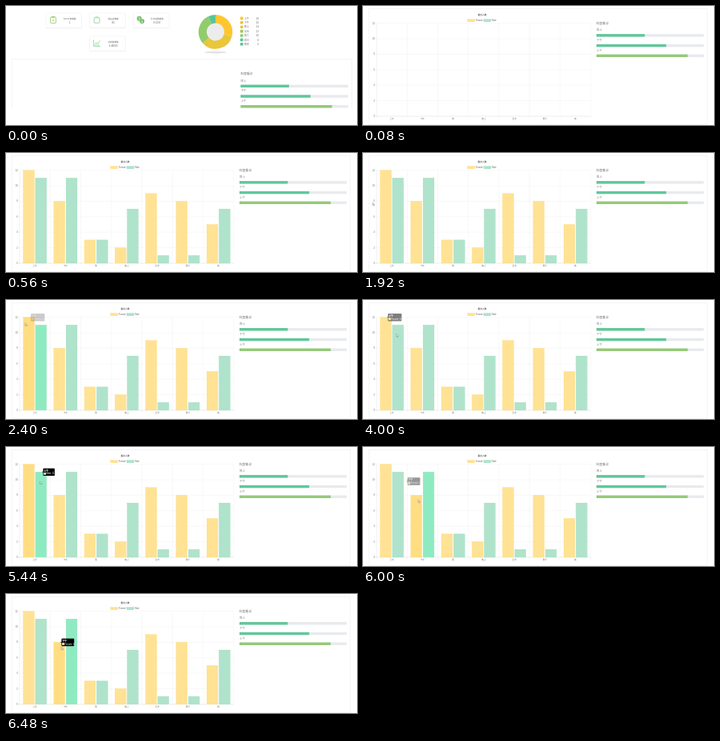
These frames come from a looping animation (439 px wide and 149 px high, 8 s). An HTML page:

```html
<!DOCTYPE html>
<html lang="zh">
<head>
<meta charset="utf-8">
<title>看诊统计</title>
<style>
html, body { margin: 0; width: 100%; height: 100%; overflow: hidden; background: #fff; }
svg { display: block; width: 100%; height: 100%; }
text { font-family: "Liberation Sans", "Noto Sans CJK SC", "Noto Sans CJK", sans-serif; fill: #666; }
</style>
</head>
<body>
<svg id="stage" viewBox="0 0 439 149"></svg>
<script>
const LOOP = 8000, STEP = 80;
const YELLOW = '#ffe294', GREEN = '#b0e3cb';
const YELLOW_ON = '#ffdd82', GREEN_ON = '#8eebc1';
const YELLOW_EDGE = '#ffd873', GREEN_EDGE = '#98d9b9';
const female = [12, 8, 3, 2, 9, 8, 5];
const male = [11, 11, 3, 7, 1, 1, 7];
const days = ['上午', '下午', '急', '晚上', '全天', '周六', '夜'];
const plot = { left: 17, right: 284.8, top: 21.6, base: 138 };
const slot = (plot.right - plot.left) / days.length;
const unit = (plot.base - plot.top) / 12;
const barW = slot * 0.36;

const stage = document.getElementById('stage');

function add(parent, tag, attrs, text) {
  const el = document.createElementNS('http://www.w3.org/2000/svg', tag);
  set(el, attrs);
  if (text !== undefined) el.textContent = text;
  parent.append(el);
  return el;
}
function set(el, attrs) {
  for (const key in attrs) el.setAttribute(key, attrs[key]);
}
const group = (parent, attrs = {}) => add(parent, 'g', attrs);
const rect = (parent, x, y, width, height, fill, more = {}) =>
  add(parent, 'rect', { x, y, width, height, fill, ...more });
const line = (parent, d, stroke, width = 0.4) =>
  add(parent, 'path', { d, stroke, 'stroke-width': width, fill: 'none' });
const label = (parent, x, y, size, text, anchor = 'start', style = '') =>
  add(parent, 'text', { x, y, 'font-size': size, 'text-anchor': anchor, style }, text);

function progressList(parent, x, top, width) {
  label(parent, x, top + 1.6, 3.8, '科室看诊');
  ['晚上', '下午', '上午'].forEach((name, i) => {
    const y = top + 14.2 + i * 12.75;
    label(parent, x, y - 3.9, 3.5, name, 'start', 'fill:#888');
    rect(parent, x, y, width, 3.4, '#e8eaee');
    rect(parent, x, y, width * (0.45 + i * 0.2), 3.4, i < 2 ? '#60c79a' : '#94c979');
  });
}

// Overview page
const overview = group(stage);

function card(x, y, title, value, icon) {
  rect(overview, x + 0.2, y + 0.6, 44.6, 18.4, '#efefef', { rx: 0.6 });
  rect(overview, x, y, 44.6, 18.2, '#fff', { rx: 0.6, stroke: '#ececec', 'stroke-width': 0.5 });
  icon(group(overview, { transform: `translate(${x + 9} ${y + 8.4})` }));
  label(overview, x + 29.5, y + 7.6, 2.7, title, 'middle');
  label(overview, x + 29.5, y + 12.6, 3, value, 'middle');
}
card(50, 9, '今日订单数量', '1', g => {
  rect(g, -3.4, -3.6, 6.8, 7.6, 'none', { rx: 0.6, stroke: '#8cca70', 'stroke-width': 0.8 });
  rect(g, -1.6, -4.5, 3.2, 1.8, '#8cca70');
  line(g, 'M-1.6 .6H1.6M0-1V2.2', '#f0c14a', 0.7);
});
card(104.6, 9, '商品总数量', '85', g => {
  rect(g, -3.4, -2.6, 6.8, 6.4, 'none', { rx: 0.6, stroke: '#7fcf9c', 'stroke-width': 0.8 });
  line(g, 'M-1.7-2.6C-1.7-5 1.7-5 1.7-2.6', '#9bd06d', 0.7);
});
card(159.4, 9, '今日销售数量', '¥ 1597', g => {
  for (const side of [-1.7, 1.7]) {
    add(g, 'circle', { cx: side, cy: side, r: 3.1, fill: '#6fbd62', stroke: '#fff', 'stroke-width': 0.3 });
    label(g, side, side + 1.4, 4, '$', 'middle', 'fill:#fff');
  }
});
card(104.6, 38, '总销售数量', '¥ 48500', g => {
  line(g, 'M-4-4V4H4.4', '#7fcf9c', 0.7);
  line(g, 'M-3 2L-1-.5L1 .8L4-3', '#8cca70', 0.7);
  line(g, 'M-2 3.6V2M0 3.6V1.5M2 3.6V.8', '#8cca70', 0.6);
});

function slice(from, to, fill) {
  const at = (deg, r) => {
    const a = deg * Math.PI / 180;
    return `${262 + r * Math.sin(a)} ${32.4 - r * Math.cos(a)}`;
  };
  add(overview, 'path', {
    fill,
    d: `M${at(from, 21.3)}A21.3 21.3 0 0 1 ${at(to, 21.3)}L${at(to, 11)}A11 11 0 0 0 ${at(from, 11)}Z`
  });
}
add(overview, 'ellipse', { cx: 262, cy: 58, rx: 14, ry: 1.4, fill: '#e3e3e3' });
add(overview, 'circle', { cx: 262, cy: 32.4, r: 11.4, fill: '#ececec' });
const ring = ['#ffc62f', '#e9c63a', '#92cb6c', '#58c596'];
const cuts = [0, 105, 228, 335, 360];
ring.forEach((fill, i) => slice(cuts[i], cuts[i + 1], fill));

['上午', '下午', '晚上', '全天', '周六', '周日', '夜间'].forEach((name, i) => {
  const y = 13.6 + i * 5.4;
  rect(overview, 293, y, 3.6, 3.6, ring[Math.floor((i + 1) / 2)], { rx: 0.5 });
  label(overview, 298, y + 3, 2.9, name);
  label(overview, 316, y + 3, 2.9, 18 - 2 * i, 'end');
});
line(overview, 'M7.2 128V66.6H432.6V128', '#ededed', 0.6);
progressList(overview, 293.4, 84.4, 134.6);

// Chart page
const detail = group(stage);
rect(detail, 7.4, 3.4, 423.4, 145, 'none', { stroke: '#ededed', 'stroke-width': 0.6 });
progressList(detail, 292, 20.9, 134.2);

for (let v = 0; v <= 12; v += 2) {
  const y = plot.base - v * unit;
  line(detail, `M${plot.left - 1.6} ${y}H${plot.right}`, v ? '#eeeeee' : '#cfcfcf');
  label(detail, 14.8, y + 1, 2.7, v, 'end');
}
for (let i = 0; i <= days.length; i++) {
  const x = plot.left + i * slot;
  line(detail, `M${x} ${plot.top}V${plot.base + 1.8}`, i ? '#eeeeee' : '#dcdcdc');
  if (i < days.length) label(detail, x + slot / 2, 142.4, 2.7, days[i], 'middle');
}
label(detail, 149, 12, 2.8, '看诊人数', 'middle', 'font-weight:bold');
['Female', 'Male'].forEach((name, side) => {
  const x = 130.8 + side * 20.2;
  rect(detail, x, 16.6, 9, 3.2, side ? GREEN : YELLOW,
    { stroke: side ? GREEN_EDGE : YELLOW_EDGE, 'stroke-width': 0.35 });
  label(detail, x + 10.2, 19.2, 2.6, name);
});

const bars = days.flatMap((_, i) => [female[i], male[i]].map((value, side) => {
  const x = plot.left + slot * (i + 0.12 + side * 0.4);
  const el = rect(detail, x, plot.base, barW, 0, '',
    { stroke: side ? GREEN_EDGE : YELLOW_EDGE, 'stroke-width': 0.35 });
  return { value, el, day: i, side, x: x + barW / 2, top: plot.base - value * unit };
}));

function makeTip({ day, side, value }, width) {
  const g = group(detail);
  const box = group(g);
  rect(box, 1.2, -4.6, width - 1.2, 9.4, '#000', { rx: 0.9 });
  add(box, 'path', { d: 'M0 0L1.3-1.2V1.2Z' });
  const body = group(g);
  label(body, 2, -0.8, 3, days[day], 'start', 'font-weight:bold;fill:#fff');
  rect(body, 2.1, 0.9, 2.5, 2.5, side ? GREEN : YELLOW, { stroke: '#fff', 'stroke-width': 0.4 });
  label(body, 5.2, 3.2, 2.7, `${side ? 'Male' : 'Female'}: ${value}`, 'start', 'fill:#fff');
  return { g, box, body };
}

// Each visit to a bar: fade-in time, fade-out time, resting pointer
const hovers = [
  { bar: bars[0], start: 2320, end: 3840, at: [24, 28.5], width: 18.4 },
  { bar: bars[1], start: 4080, end: 5440, at: [42.5, 43], width: 15.6 },
  { bar: bars[2], start: 5840, end: LOOP, at: [69, 66], width: 17 }
];
for (const h of hovers) h.tip = makeTip(h.bar, h.width);

const cursor = add(detail, 'path', {
  d: 'M0 0V3.6L.9 2.8L1.5 4.2L2.1 3.9L1.5 2.6H2.6Z',
  fill: '#fff', stroke: '#555', 'stroke-width': 0.35
});

const ramp = (t, from, length) => Math.min(1, Math.max(0, (t - from) / length));
const lerp = (a, b, p) => a + (b - a) * p;
const easeOut = (p, power) => 1 - (1 - p) ** power;

function mix(from, to, p) {
  const part = (hex, i) => parseInt(hex.slice(1 + i * 2, 3 + i * 2), 16);
  return `rgb(${[0, 1, 2].map(i => Math.round(lerp(part(from, i), part(to, i), p)))})`;
}

function draw(time) {
  const t = Math.floor(time / STEP) * STEP;
  overview.style.display = t < 80 ? '' : 'none';
  detail.style.display = t < 80 ? 'none' : '';

  const glow = days.map(() => 0);
  let pointer = [12, 62];
  hovers.forEach(({ bar, start, end, at, tip }, i) => {
    const from = hovers[Math.max(0, i - 1)].bar;
    const p = ramp(t, start, 400);
    const opacity = p * (1 - ramp(t, end, 320));
    set(tip.g, { transform: `translate(${lerp(from.x, bar.x, p) + 1.5} ${lerp(from.top, bar.top, p)})` });
    set(tip.box, { opacity });
    set(tip.body, { opacity: Math.min(1, opacity * 2) });

    glow[bar.day] += ramp(t, start - 80, 160) * (1 - ramp(t, end, 160));
    const move = easeOut(ramp(t, start - 400, 400), 2);
    pointer = pointer.map((v, axis) => lerp(v, at[axis], move));
  });
  set(cursor, {
    transform: `translate(${pointer})`,
    visibility: t < 1920 ? 'hidden' : 'inherit'
  });

  const grow = easeOut(ramp(t, 160, 400), 4);
  for (const { el, value, side, day } of bars) {
    const height = value * unit * grow;
    set(el, {
      y: plot.base - height,
      height,
      fill: side ? mix(GREEN, GREEN_ON, glow[day]) : mix(YELLOW, YELLOW_ON, glow[day])
    });
  }
}

const begin = performance.now();
function tick() {
  draw((performance.now() - begin) % LOOP);
  requestAnimationFrame(tick);
}
tick();
</script>
</body>
</html>
```
